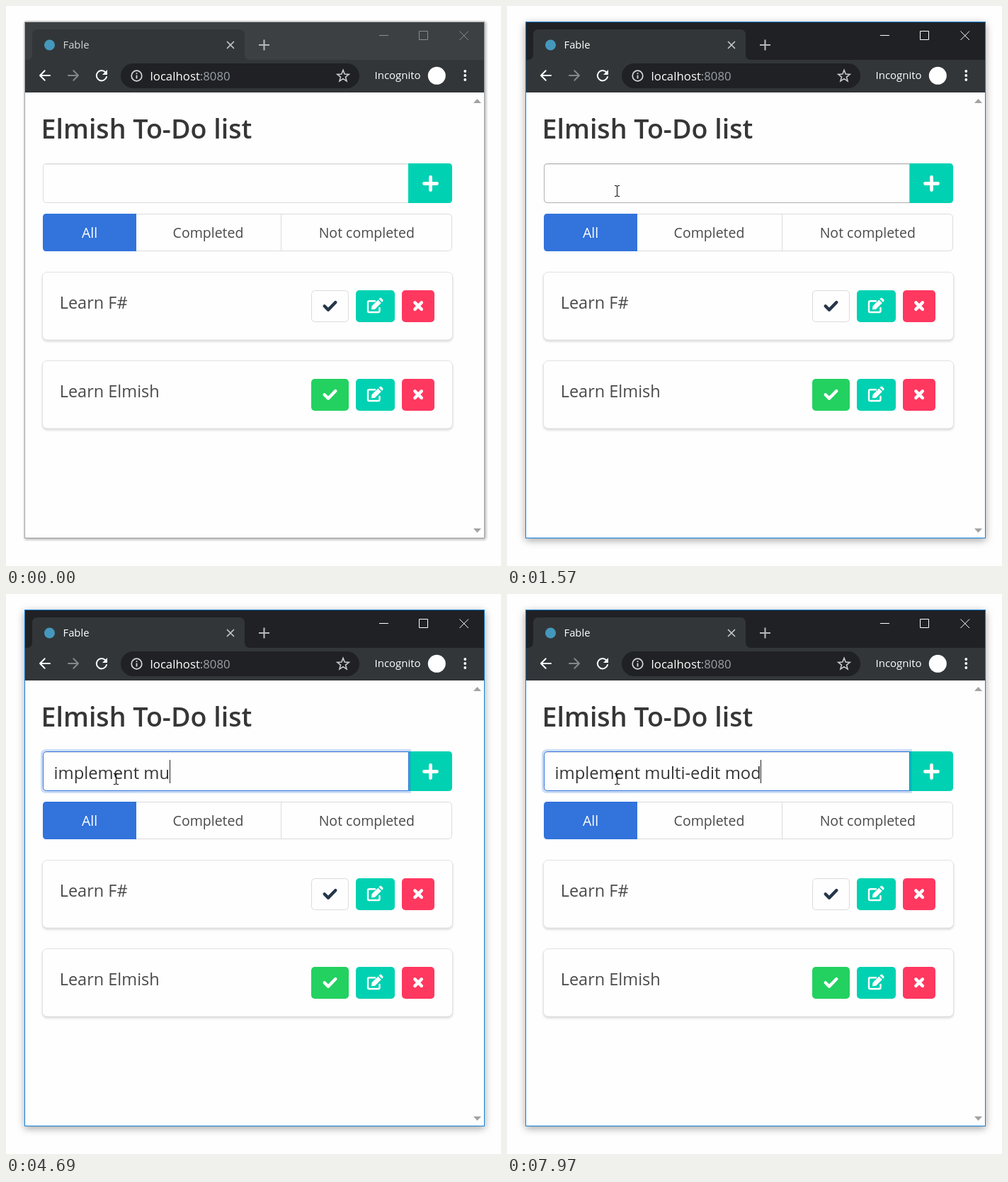
These frames come from a looping animation (699 by 790 pixels, 8000 ms). An HTML page:

```html
<!DOCTYPE html>
<html lang="en">
<head>
<meta charset="utf-8">
<title>To-Do list</title>
<style>
  html, body { margin: 0; width: 100%; height: 100%; overflow: hidden; background: #fefefe; }
  #stage { position: absolute; left: 0; top: 0; width: 699px; height: 790px; overflow: hidden; }
  #shadow { position: absolute; left: 27px; top: 23px; width: 648px; height: 727px; border-radius: 2px;
    box-shadow: 1px 1px 3px 1px rgba(0,0,0,.28), 1px 1px 1px 4px #ebebeb; }
  .active #shadow { box-shadow: 0 3px 11px 1px rgba(0,0,0,.36); }
  svg { position: absolute; left: 0; top: 0; }
  text { font-family: "Open Sans", "Noto Sans", sans-serif; white-space: pre; }
  .line { fill: none; stroke-linecap: round; stroke-linejoin: round; }
  .mid { text-anchor: middle; font-size: 19.5px; fill: #4a4a4a; }
  .item { font-size: 23.5px; fill: #4a4a4a; }
  .card { fill: #fefefe; filter: drop-shadow(0 2px 1.5px rgba(10,10,10,.15)); stroke: #e2e2e2; }
  #titlebar { fill: #3c4043; }
  #tabName { fill: #d3d5d7; }
  #controls { stroke: #8b8e90; fill: none; }
  #border { fill: none; stroke: #a4a4a4; }
  .active #titlebar { fill: #202124; }
  .active #tabName { fill: #fff; }
  .active #controls { stroke: #fff; }
  .active #border { stroke: #1480d8; }
  #field { fill: #fefefe; stroke: #dbdbdb; }
  #fieldEdge { fill: none; stroke: none; }
  .hover #fieldEdge { stroke: #b0b0b0; }
  .focus #fieldEdge { stroke: #3273dc; }
  #ring, #caret { visibility: hidden; }
  .focus #ring { visibility: visible; }
</style>
</head>
<body>
<div id="stage">
  <div id="shadow"></div>
  <svg width="699" height="790" viewBox="0 0 699 790">
    <defs>
      <path id="check" class="line" d="M449.7 423.3L455 428.6 465.3 418" stroke-width="4.4"/>
      <g id="tools">
        <rect x="494" y="401" width="55" height="45" rx="5" fill="#00d1b2"/>
        <path class="line" d="M521 416.3H513a2 2 0 0 0-2 2V430a2 2 0 0 0 2 2H525.5a2 2 0 0 0 2-2V426" stroke="#fff" stroke-width="2.4"/>
        <path d="M516.5 423.2L525.3 414.4 529.8 418.9 521 427.7 516 428.3ZM526.4 413.3L528 411.9Q529 411.2 530 412L532.2 414.2Q533 415.2 532.2 416.4L530.9 417.8Z" fill="#fff"/>
        <rect x="559" y="401" width="46" height="45" rx="5" fill="#ff3860"/>
        <path class="line" d="M577.4 418.4L586.8 427.8M586.8 418.4L577.4 427.8" stroke="#fff" stroke-width="4.5"/>
      </g>
    </defs>

    <!-- browser chrome -->
    <rect x="27" y="23" width="648" height="727" fill="#fefefe"/>
    <rect id="titlebar" x="27" y="23" width="648" height="54"/>
    <path d="M27 76H29Q37 76 37 68V41Q37 33 45 33H329Q337 33 337 41V68Q337 76 345 76H675V122H27Z" fill="#323639"/>
    <circle cx="61.5" cy="55" r="7.5" fill="#4598bd"/>
    <text id="tabName" x="80.5" y="60" font-size="14.8">Fable</text>
    <path class="line" d="M312.5 50.5L321.5 59.5M321.5 50.5L312.5 59.5" stroke="#c5c8cb" stroke-width="1.7"/>
    <path d="M357 55H372M364.5 47.5V62.5" stroke="#b5b8ba" stroke-width="2.1"/>
    <path id="controls" d="M527 41.5H540M583.5 35.5H595.5V47.5H583.5ZM640.5 35.5L653 48M653 35.5L640.5 48"/>
    <path id="back" class="line" d="M62 98H48M54.7 91.3L48 98 54.7 104.7" stroke="#fff" stroke-width="2"/>
    <path class="line" d="M88 98H102M95.3 91.3L102 98 95.3 104.7" stroke="#85888a" stroke-width="2"/>
    <path class="line" d="M140.2 93.2A7.2 7.2 0 1 0 142 100" stroke="#fff" stroke-width="2"/>
    <path d="M143 90V97H136Z" fill="#fff"/>
    <rect x="162" y="81" width="337" height="35" rx="17.5" fill="#202124"/>
    <circle cx="184.5" cy="98.5" r="7.3" fill="none" stroke="#d5d7d9" stroke-width="1.7"/>
    <path d="M184.5 97.5V102.5M184.5 94.3V96" stroke="#d5d7d9" stroke-width="1.8"/>
    <text x="203.5" y="105" font-size="16.8" fill="#fff">localhost<tspan fill="#9aa0a6">:8080</tspan></text>
    <path id="star" fill="none" stroke="#c8cacc" stroke-width="1.6"/>
    <text x="520.5" y="103" font-size="15" fill="#fff">Incognito</text>
    <circle cx="608.3" cy="98.3" r="12.5" fill="#fff"/>
    <g fill="#fff"><circle cx="648.3" cy="92" r="1.9"/><circle cx="648.3" cy="98" r="1.9"/><circle cx="648.3" cy="104" r="1.9"/></g>
    <path d="M660 137L665.5 131 671 137ZM660 737L665.5 743 671 737Z" fill="#a3a3a3"/>

    <!-- page -->
    <text x="49.5" y="187" font-size="37.6" font-weight="600" fill="#363636">Elmish To-Do list</text>
    <path id="field" d="M569 222.5H57.5Q52.5 222.5 52.5 227.5V272.5Q52.5 277.5 57.5 277.5H569"/>
    <path d="M55 223.5H568" stroke="#ececec"/>
    <path d="M568 222H625Q630 222 630 227V273Q630 278 625 278H568Z" fill="#00d1b2"/>
    <path class="line" d="M590.5 250.5H608.5M599.5 241.5V259.5" stroke="#fff" stroke-width="4.8"/>
    <path id="ring" d="M570.5 220.5H57Q50.5 220.5 50.5 227V273Q50.5 279.5 57 279.5H570.5Z" fill="none" stroke="#3273dc" stroke-opacity=".25" stroke-width="3"/>
    <path id="fieldEdge" d="M568.5 222.5H57.5Q52.5 222.5 52.5 227.5V272.5Q52.5 277.5 57.5 277.5H568.5Z"/>
    <text id="typed" x="67.5" y="261" font-size="23.8" fill="#363636"></text>
    <rect id="caret" y="234" width="1" height="33" fill="#222"/>

    <rect x="52.5" y="293.5" width="577" height="52" rx="5" fill="#fefefe" stroke="#dbdbdb"/>
    <path d="M184 293H57Q52 293 52 298V341Q52 346 57 346H184Z" fill="#3273dc"/>
    <path d="M388.5 293V346" stroke="#dbdbdb"/>
    <text class="mid" x="118" y="327" style="fill:#fff">All</text>
    <text class="mid" x="285.5" y="327">Completed</text>
    <text class="mid" x="509.3" y="327">Not completed</text>

    <rect class="card" x="51.5" y="375.5" width="579" height="95.5" rx="6.5"/>
    <text class="item" x="75.7" y="427">Learn F#</text>
    <rect x="431.5" y="401.5" width="52" height="44" rx="5" fill="#fefefe" stroke="#dbdbdb"/>
    <use href="#check" stroke="#26364a"/>
    <use href="#tools"/>

    <rect class="card" x="51.5" y="500.5" width="579" height="95.5" rx="6.5"/>
    <text class="item" x="75.7" y="552">Learn Elmish</text>
    <rect x="431" y="526" width="53" height="45" rx="5" fill="#23d160"/>
    <use href="#check" y="125" stroke="#fff"/>
    <use href="#tools" y="125"/>

    <rect id="border" x="26.5" y="22.5" width="649" height="728"/>

    <!-- pointers, each with its hot spot at 0,0 -->
    <g id="pointer">
      <path id="arrow" d="M0 0V16.5L3.8 12.9 6.3 18.6 8.8 17.5 6.3 12H11.7Z" fill="#fff" stroke="#000"/>
      <path id="hand" d="M-1.8 1.2Q-1.8-.5 0-.5T1.8 1.2V7.6Q4.6 6.6 5.2 8.4 7.2 7.6 8 9.4 10.5 9 10.5 11.5V16Q10.5 19 8.5 21.2V23.5H-.8V21.4L-5.8 14.2Q-6.4 12.5-5 12 -3.6 11.6-1.8 14Z" fill="#fff" stroke="#000"/>
      <path id="beam" d="M-3-7.5H-1Q.5-7.5.5-6V6Q.5 7.5-1 7.5H-3M4-7.5H2Q.5-7.5.5-6V6Q.5 7.5 2 7.5H4" fill="none" stroke="#000"/>
    </g>
  </svg>
</div>
<script>
const LOOP = 8000, SHOWN = 60, ACTIVATED = 1570, FOCUSED = 1600;
const el = id => document.getElementById(id);

// [ms, x, y] waypoints of the pointer
const path = [
  [60, 477, 750], [320, 310, 600], [520, 210, 500], [650, 194, 460],
  [840, 160, 370], [1000, 155, 320], [1099, 155, 320], [1230, 155, 290],
  [1360, 155, 266], [1490, 155, 261]
];
// the pointer is sampled every 65 ms, counted from these times
const sampleStarts = [60, 870, 1100];

const phrase = 'implement multi-edit mod';
const keyTimes = [2350, 2500, 2690, 2980, 3210, 3290, 3370, 3450, 3970, 4110, 4500, 4690,
  5040, 5480, 5560, 5900, 6840, 6980, 7120, 7210, 7450, 7690, 7880, 7970];
const caretOff = [[2110, 2350], [6400, 6840]];

function starPath(cx, cy, outer, inner) {
  const points = Array.from({ length: 10 }, (_, i) => {
    const r = i % 2 ? inner : outer, a = i * Math.PI / 5 - Math.PI / 2;
    return `${cx + r * Math.cos(a)} ${cy + r * Math.sin(a)}`;
  });
  return `M${points.join('L')}Z`;
}

function pointerAt(time) {
  const start = sampleStarts.filter(s => s <= time).pop();
  const t = start + Math.floor((time - start) / 65) * 65;
  const next = path.findIndex(p => p[0] > t);
  if (next < 0) return path[path.length - 1].slice(1);
  const [t0, x0, y0] = path[next - 1], [t1, x1, y1] = path[next];
  const k = (t - t0) / (t1 - t0);
  return [Math.round(x0 + (x1 - x0) * k), Math.round(y0 + (y1 - y0) * k)];
}

const show = (node, on) => { node.style.visibility = on ? 'visible' : 'hidden'; };

function drawPointer(t) {
  const visible = t >= SHOWN;
  const [x, y] = visible ? pointerAt(t) : [0, 0];
  const overField = visible && y >= 222 && y < 278;
  const overTab = visible && y >= 293 && y < 346;
  el('pointer').setAttribute('transform', `translate(${x} ${y})`);
  show(el('beam'), overField);
  show(el('hand'), overTab);
  show(el('arrow'), visible && !overField && !overTab);
  return overField;
}

function draw(t) {
  const classes = el('stage').classList;
  classes.toggle('hover', drawPointer(t));
  classes.toggle('active', t >= ACTIVATED);
  classes.toggle('focus', t >= FOCUSED);

  const text = phrase.slice(0, keyTimes.filter(k => k <= t).length);
  const typed = el('typed');
  if (typed.textContent !== text) typed.textContent = text;
  const width = text ? typed.getComputedTextLength() : 0;
  el('caret').setAttribute('x', Math.round(68 + width) - (text ? 1 : 0));
  show(el('caret'), t >= FOCUSED && !caretOff.some(([a, b]) => t >= a && t < b));
}

el('star').setAttribute('d', starPath(476, 99, 8.6, 3.7));

const begin = performance.now();
function tick() {
  draw((performance.now() - begin) % LOOP);
  requestAnimationFrame(tick);
}
tick();
</script>
</body>
</html>
```
